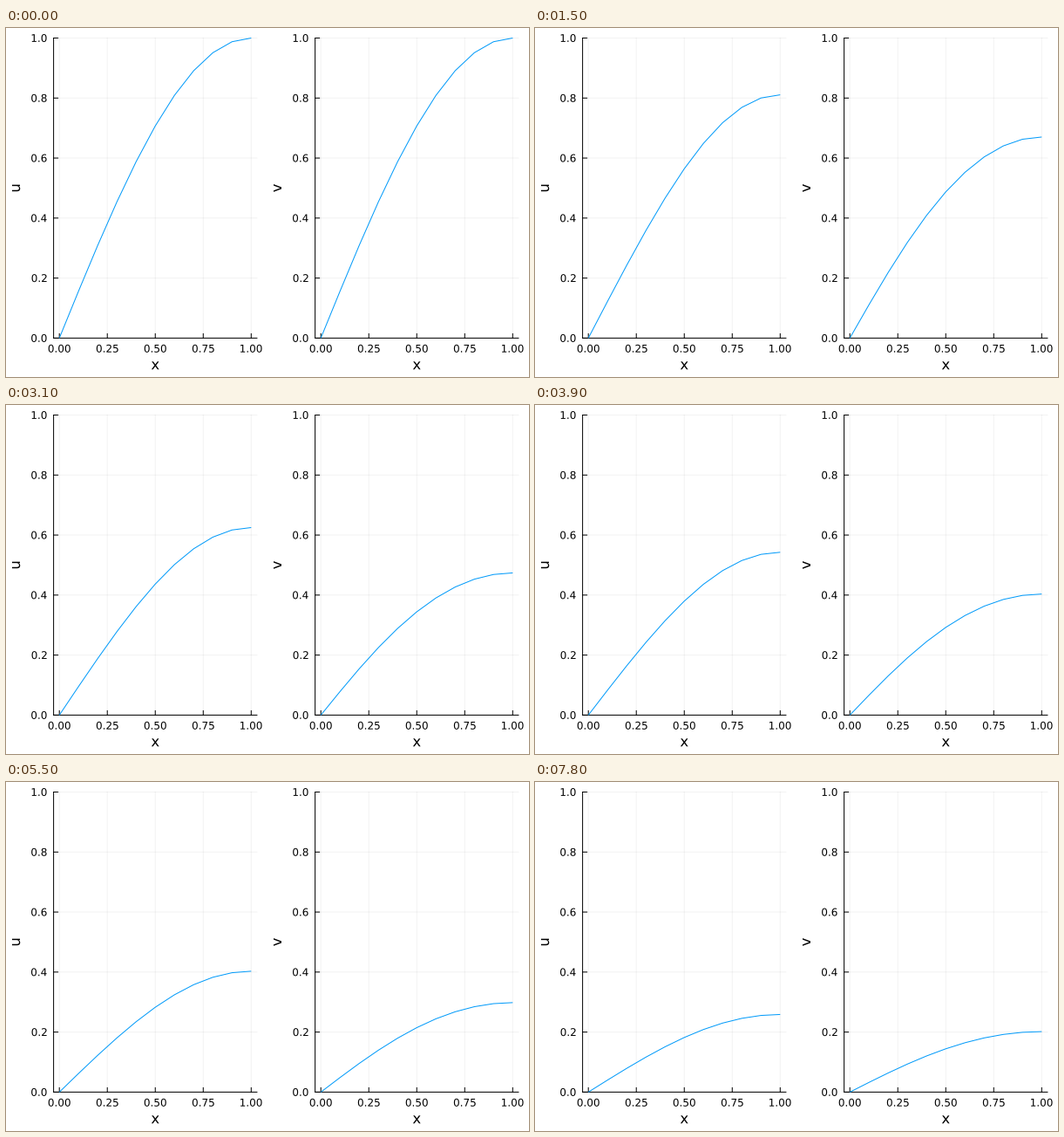
Animation of 600x400 px, one loop 7900 ms. Source, as a matplotlib script:

```python
import matplotlib.pyplot as plt
import numpy as np
from matplotlib.animation import FuncAnimation
from matplotlib.patches import PathPatch
from matplotlib.textpath import TextPath
from matplotlib.transforms import Affine2D

W, H, DPI = 600, 400, 100
FRAMES, INTERVAL = 79, 100
PX = 72 / DPI  # points per pixel
TOP, BOTTOM = 11.5, 355.4
PANEL_W, TICK = 233.3, 5

# Reaction-diffusion pair: u_t = Du u_xx + uv, v_t = Dv v_xx - uv,
# fixed to zero at x = 0 and with zero flux at x = 1.
DIFFUSION = np.array([[0.7135], [0.449]])
x = np.linspace(0, 1, 11)
dx = x[1]


def rhs(w):
    lap = np.zeros_like(w)
    lap[:, 1:-1] = w[:, 2:] - 2 * w[:, 1:-1] + w[:, :-2]
    lap[:, -1] = 2 * (w[:, -2] - w[:, -1])
    reaction = w[0] * w[1]
    out = DIFFUSION * lap / dx**2 + np.array([reaction, -reaction])
    out[:, 0] = 0
    return out


def solve(times, max_dt=0.001):
    w = np.tile(np.sin(np.pi * x / 2), (2, 1))
    states = [w]
    for span in np.diff(times):
        steps = max(1, int(np.ceil(span / max_dt)))
        dt = span / steps
        for _ in range(steps):
            k1 = rhs(w)
            k2 = rhs(w + dt / 2 * k1)
            k3 = rhs(w + dt / 2 * k2)
            k4 = rhs(w + dt * k3)
            w = w + dt / 6 * (k1 + 2 * k2 + 2 * k3 + k4)
        states.append(w)
    return states


# The time step starts large and settles to a constant.
n = np.arange(FRAMES)
times = np.minimum(1, 0.0127 * n + 0.0158 * (1 - np.exp(-n / 1.5)))
states = solve(times)

# One axes over the whole stage, in pixels with y pointing down.
fig = plt.figure(figsize=(W / DPI, H / DPI), dpi=DPI, facecolor="white")
ax = fig.add_axes([0, 0, 1, 1])
ax.set(xlim=(0, W), ylim=(H, 0))
ax.axis("off")


def stroke(xs, ys, color="black", **kw):
    return ax.plot(xs, ys, color=color, lw=PX, snap=False, **kw)[0]


def label(px, py, text, size, align=0.5, angle=0):
    """Outline text with its baseline at py; align 0.5 centres, 1 ends at px."""
    path = TextPath((0, 0), text, size=size, prop={"family": "DejaVu Sans"})
    box = path.get_extents()
    place = (Affine2D().translate(-box.x0 - align * box.width, 0)
             .rotate_deg(angle).scale(1, -1).translate(px, py))
    ax.add_patch(PathPatch(path, fc="black", lw=0, transform=place + ax.transData))


def to_y(value):
    return BOTTOM - value * (BOTTOM - TOP)


def panel(left, name):
    right = left + PANEL_W

    def to_x(value):
        return left + PANEL_W * (value + 0.03) / 1.06

    for t in np.linspace(0, 1, 5):
        px = to_x(t)
        stroke([px, px], [TOP, BOTTOM], alpha=0.05, zorder=1)
        stroke([px, px], [BOTTOM, BOTTOM - TICK])
        label(px, 371.7, f"{t:.2f}", 12)
    for t in np.linspace(0, 1, 6):
        py = to_y(t)
        stroke([left, right], [py, py], alpha=0.05, zorder=1)
        stroke([left, left + TICK], [py, py])
        label(left - 8, py + 4.4, f"{t:.1f}", 12, align=1)
    stroke([left, left, right], [TOP, BOTTOM, BOTTOM])
    label(left + PANEL_W / 2, 391.3, "x", 16.5)
    label(left - 38.6, (TOP + BOTTOM) / 2, name, 16.5, angle=90)
    return stroke(to_x(x), to_y(0 * x), color="#009AFA", zorder=3,
                  solid_capstyle="butt")


lines = [panel(54.6, "u"), panel(354.6, "v")]


def update(i):
    for line, values in zip(lines, states[i]):
        line.set_ydata(to_y(values))
    return lines


anim = FuncAnimation(fig, update, frames=FRAMES, interval=INTERVAL,
                     init_func=lambda: update(0), repeat=True, repeat_delay=0)
plt.show()
```
